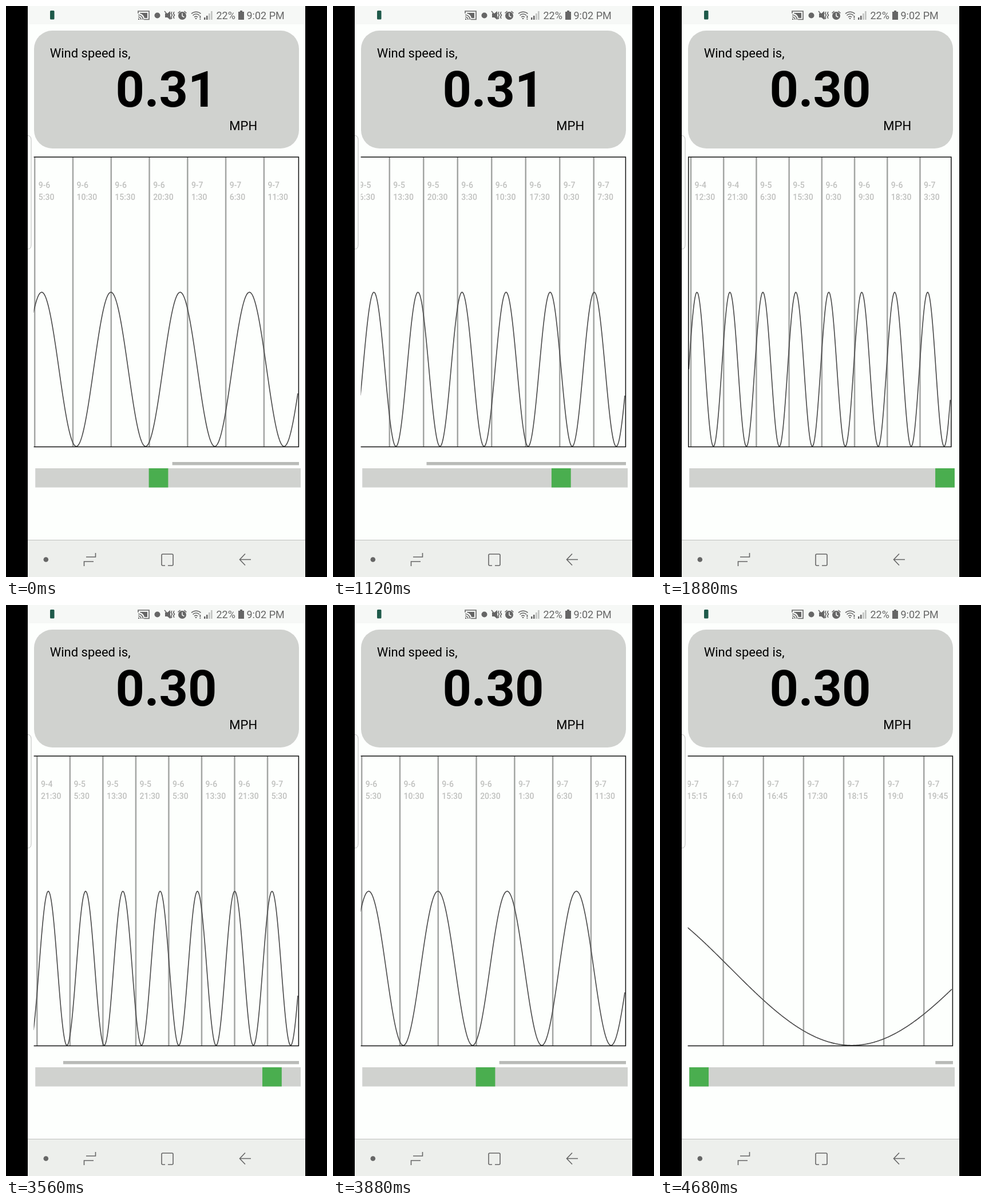
Recreate the animation shown at these times as an HTML page. Size 561x998 px, loop 5000 ms.

```html
<!DOCTYPE html>
<html lang="en">
<head>
<meta charset="utf-8">
<title>Wind speed</title>
<style>
  html, body { margin: 0; width: 100%; height: 100%; overflow: hidden; background: #000; }
  svg { display: block; width: 100%; height: 100%; font-family: Roboto, sans-serif; }
  .line { fill: none; stroke: #666; stroke-width: 1.6; }
  .label { font-size: 14px; font-weight: 500; fill: #bfc0be; }
</style>
</head>
<body>
<svg viewBox="0 0 561 998">
  <defs><clipPath id="view"><rect x="48.6" y="262" width="465" height="511"/></clipPath></defs>
  <rect x="38" width="485" height="998" fill="#fdfffd"/>
  <rect x="38" width="485" height="32" fill="#f6f8f6"/>

  <!-- status bar -->
  <rect x="77" y="8" width="7.5" height="15.5" rx="1.5" fill="#1f5a4a"/>
  <g fill="#666">
    <path class="line" d="M231 13V9H250V23.500H241"/>
    <path class="line" d="M231 15.500a8.500 8.500 0 0 1 8.500 8.500M231 19a5 5 0 0 1 5 5"/>
    <path d="M231 21.500a2.500 2.500 0 0 1 2.500 2.500H231zM234 12H247V21H242A11 11 0 0 0 234 13z"/>
    <circle cx="264.500" cy="16.500" r="5"/>
    <path d="M278 13h4l5-4v15l-5-4h-4z"/>
    <path class="line" d="M277 9L289 23M290 10l-1.500 3 2 3-2 3 1.500 3M294 10l-1.500 3 2 3-2 3 1.500 3"/>
    <circle cx="308" cy="17" r="7"/>
    <path class="line" d="M300.500 12.500l4-3.500M315.500 12.500l-4-3.500"/>
    <path d="M308 12.500V17.500l3.500 2" fill="none" stroke="#f6f8f6" stroke-width="1.500"/>
    <path class="line" d="M324 13.500a12 12 0 0 1 16.500 0M326.500 16.500a8 8 0 0 1 11.500 0M329 19.500a4.500 4.500 0 0 1 6 0"/>
    <path d="M330 21h4l-2 2.500zM338.500 17h1.800v4h-1.800zM338.500 22h1.800v1.800h-1.800z"/>
    <path d="M346 20h2.500v4H346zM350 17h2.500v7H350z"/>
    <path d="M354 13h2.700v11H354zM358 9h2.700v15H358z" fill="#c2c4c2"/>
    <path d="M406 10h3V8h4v2h3v14H406z"/>
    <g font-size="18"><text x="367.500" y="23">22%</text><text x="420.500" y="23">9:02 PM</text></g>
  </g>

  <!-- reading -->
  <rect x="49" y="43" width="463" height="206" rx="32" fill="#d0d2cf"/>
  <g font-size="22">
    <text x="76.700" y="90">Wind speed is,</text>
    <text x="390.300" y="217">MPH</text>
  </g>
  <text id="speed" x="191.500" y="176" font-size="88" font-weight="700"></text>
  <path d="M38 226.500q6 0 6 8V417q0 8-6 8" fill="#fdfffd" stroke="#bbb"/>

  <g id="chart" clip-path="url(#view)"></g>

  <rect id="bar" y="797" height="5.500" fill="#b9bbb8"/>
  <rect x="51.200" y="808" width="463.800" height="33.500" fill="#d0d2cf"/>
  <rect id="thumb" y="808" width="33.800" height="33.500" fill="#4aae4f"/>

  <!-- navigation bar -->
  <rect x="38" y="933" width="485" height="65" fill="#edefec"/>
  <rect x="38" y="933" width="485" height="1" fill="#bfc1bf"/>
  <circle cx="69.800" cy="967.500" r="4.300" fill="#666"/>
  <g class="line">
    <path d="M140 963H156.500V956M136 971H153M136.500 979V971H153M140 963H156.500"/>
    <path d="M278 978H274Q272 978 272 976V960Q272 958 274 958H290Q292 958 292 960V976Q292 978 290 978H283"/>
    <path d="M428 967.500H409M418 957.500L408.500 967.500 418 977.500"/>
  </g>
</svg>
<script>
const $ = id => document.getElementById(id);
const LOOP = 5000, LAST = 13, DATA_HOURS = 72.1, WAVE_HOURS = 9.06;
const gridHours = [.75, 1.5, 2, 3, 3, 4, 5, 5, 6, 6, 7, 7, 8, 9];

// [time in ms, zoom level]
const moves = [[0, 6], [440, 7], [560, 8], [880, 9], [1040, 10],
  [1400, 11], [1480, 12], [1560, 13],
  [3560, 12], [3600, 11], [3680, 10], [3720, 9], [3800, 8], [3840, 7], [3880, 6],
  [3920, 5], [4000, 4], [4160, 3], [4280, 2], [4440, 1], [4600, 0]];

function label(x, hour) {
  const day = 7 + Math.floor(hour / 24), h = (hour + 240) % 24;
  const text = (y, s) => `<text class="label" x="${x}" y="${y}">${s}</text>`;
  return text(318, `9-${day}`) + text(338.5, `${Math.floor(h)}:${h % 1 * 60}`);
}

function drawChart(level) {
  const whole = level === LAST;
  const end = whole ? 508.5 : 511;
  const scale = whole ? 6.357 : 467.5 / (5 * (level + 1));   // px per hour
  const start = whole ? 49.7 : end - DATA_HOURS * scale;
  const step = gridHours[level], offset = level ? .5 : .25;
  const nudge = level ? 0 : 3;
  let grid = '', curve = '';

  for (let k = 1; ; k++) {
    const x = end - nudge - (k * step - offset) * scale;
    if (x < Math.max(start, 0)) break;
    grid += `<path d="M${x} 264V770" stroke="#a3a5a3" stroke-width="2.500"/>` +
      label(x + 6.6, 21 + offset - (k + 1) * step);
  }

  const wave = WAVE_HOURS * scale;
  for (let x = Math.max(start + .5, 48); x <= end - 1; x++) {
    const y = 635 + 134.7 * Math.cos(2 * Math.PI * ((x - end) / wave + .2075));
    curve += `${curve ? 'L' : 'M'}${x.toFixed(1)} ${y.toFixed(2)}`;
  }

  const left = Math.max(start, 0);
  $('chart').innerHTML = grid +
    `<path d="${curve}" fill="none" stroke="#484848" stroke-width="1.600"/>` +
    `<rect x="${left}" y="264" width="${end + .4 - left}" height="506.500" fill="none" stroke="#111" stroke-width="1.500"/>`;

  const barX = 481.3 - 31.78 * level;
  $('bar').setAttribute('x', barX);
  $('bar').setAttribute('width', whole ? 0 : 512 - barX);
  $('thumb').setAttribute('x', 51.2 + 33.07 * level);
}

let shown = -1;
function frame(now) {
  const t = now % LOOP;
  const level = moves.filter(m => m[0] <= t).pop()[1];
  if (level !== shown) drawChart(shown = level);
  $('speed').textContent = t < 1840 ? '0.31' : '0.30';
  requestAnimationFrame(frame);
}
const begin = performance.now();
const tick = now => frame(Math.max(0, now));
frame(0);
</script>
</body>
</html>
```
